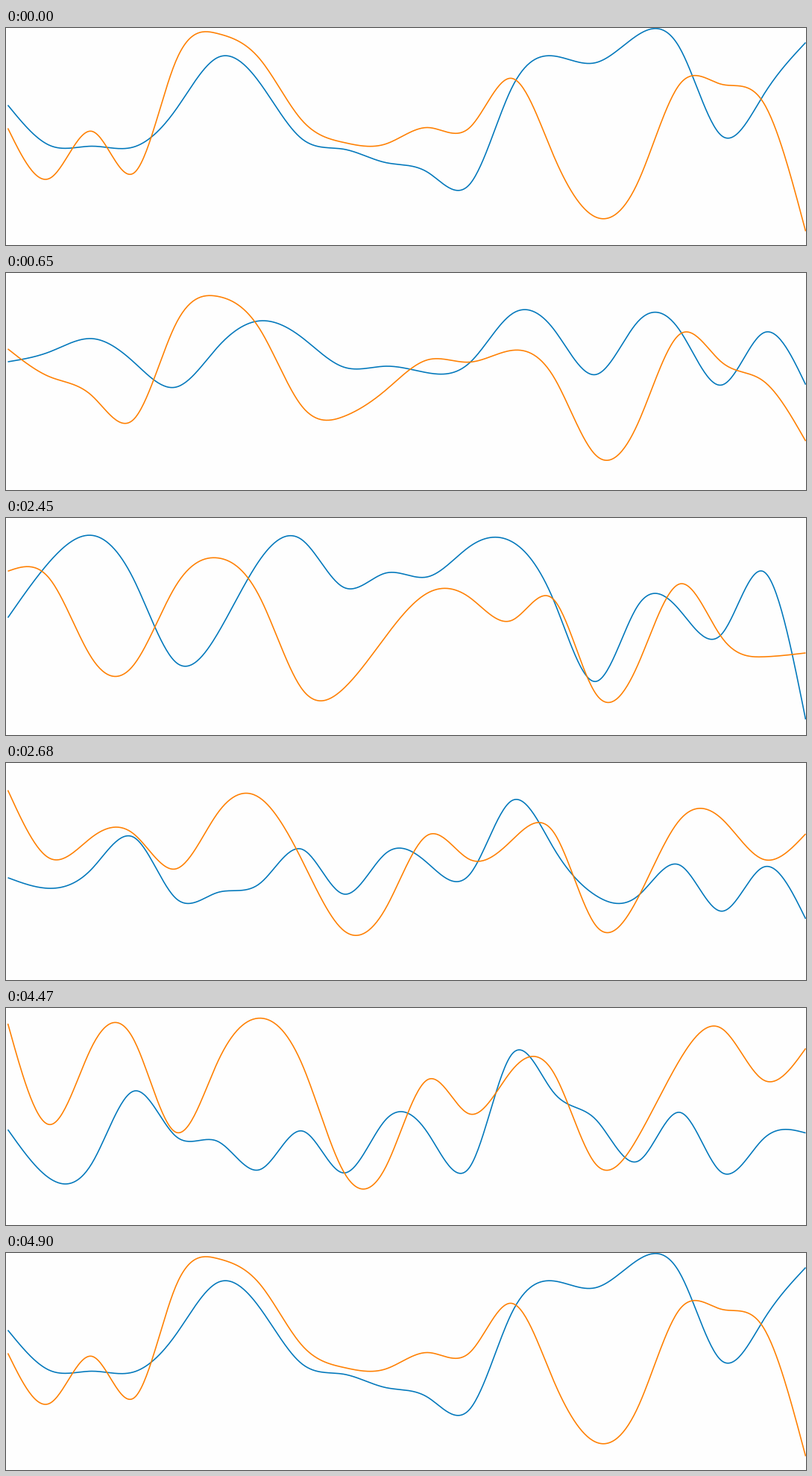
Write a matplotlib script that moves like this. It is 1073 px wide and 291 px high and loops after 5.92 s.

```python
import numpy as np
import matplotlib.pyplot as plt
from matplotlib.animation import FuncAnimation

W, H, DPI = 1073, 291, 64
LOOP, TICK = 5920, 20
BLUE, ORANGE = "#0077bb", "#ff7f00"

# Key heights in pixels, evenly spaced from left to right, one list per pose.
BLUE_KEYS = np.array([
    [103, 157, 158, 159, 109, 39, 73, 148, 162, 180,
     193, 209, 80, 37, 46, 9, 26, 144, 89, 19],
    [133, 57, 22, 82, 193, 154, 55, 28, 92, 73,
     78, 37, 31, 110, 219, 117, 123, 155, 71, 270],
    [165, 231, 210, 109, 174, 184, 222, 165, 223, 148,
     166, 213, 61, 116, 153, 213, 144, 223, 178, 173]])
ORANGE_KEYS = np.array([
    [134, 201, 138, 194, 44, 7, 41, 123, 153, 155,
     133, 133, 67, 171, 253, 207, 75, 75, 100, 272],
    [71, 81, 188, 197, 90, 53, 106, 229, 228, 158,
     100, 106, 137, 109, 235, 197, 88, 160, 186, 181],
    [16, 154, 48, 36, 171, 74, 12, 72, 222, 215,
     94, 142, 84, 83, 207, 172, 69, 25, 96, 45]])

# Start ms, end ms, number of steps, progress at the first step.
MOVES = [(420, 950, 8, 0.136), (2450, 2880, 7, 0.1), (4470, 4900, 7, 0.213)]


def natural_spline(keys, samples):
    """Natural cubic spline through evenly spaced keys, row by row."""
    n = keys.shape[1]
    lhs = 4 * np.eye(n) + np.eye(n, k=1) + np.eye(n, k=-1)
    lhs[0, 0] = lhs[-1, -1] = 2
    padded = np.pad(keys, ((0, 0), (1, 1)), mode="edge")
    rhs = 3 * (padded[:, 2:] - padded[:, :-2])
    slopes = np.linalg.solve(lhs, rhs.T).T

    pos = np.linspace(0, n - 1, samples)
    seg = np.minimum(pos.astype(int), n - 2)
    u = pos - seg
    rise = u * u * (3 - 2 * u)
    return ((1 - rise) * keys[:, seg] + rise * keys[:, seg + 1]
            + u * (1 - u) ** 2 * slopes[:, seg]
            + u * u * (u - 1) * slopes[:, seg + 1])


def ease(t):
    """Cubic in-out."""
    return 4 * t ** 3 if t < 0.5 else 1 - 4 * (1 - t) ** 3


def pose_at(now):
    """Index of the pose being left and the share of the next one."""
    for i, (start, end, steps, first) in reversed(list(enumerate(MOVES))):
        if now >= start:
            last = steps - 1
            step = min((now - start) * last // (end - start), last)
            return i, ease(first + (1 - first) * step / last)
    return 0, 0


fig = plt.figure(figsize=(W / DPI, H / DPI), dpi=DPI, facecolor="#fefefe")
ax = fig.add_axes([0, 0, 1, 1])
# Whole numbers fall on pixel centres.
ax.set_xlim(-0.5, W - 0.5)
ax.set_ylim(H - 0.5, -0.5)
ax.axis("off")

xs = np.linspace(2, 1072, 600)
curves = []
for keys, color in ((BLUE_KEYS, BLUE), (ORANGE_KEYS, ORANGE)):
    poses = natural_spline(keys, len(xs))
    line, = ax.plot(xs, poses[0], color=color, lw=1.6 * 72 / DPI,
                    solid_capstyle="butt")
    curves.append((line, poses))


def draw(frame):
    i, share = pose_at(frame * TICK + TICK // 2)
    for line, poses in curves:
        goal = poses[(i + 1) % len(poses)]
        line.set_ydata(poses[i] + (goal - poses[i]) * share)
    return [line for line, _ in curves]


anim = FuncAnimation(fig, draw, frames=LOOP // TICK, interval=TICK,
                     repeat=True, repeat_delay=0, blit=False)
plt.show()
```
